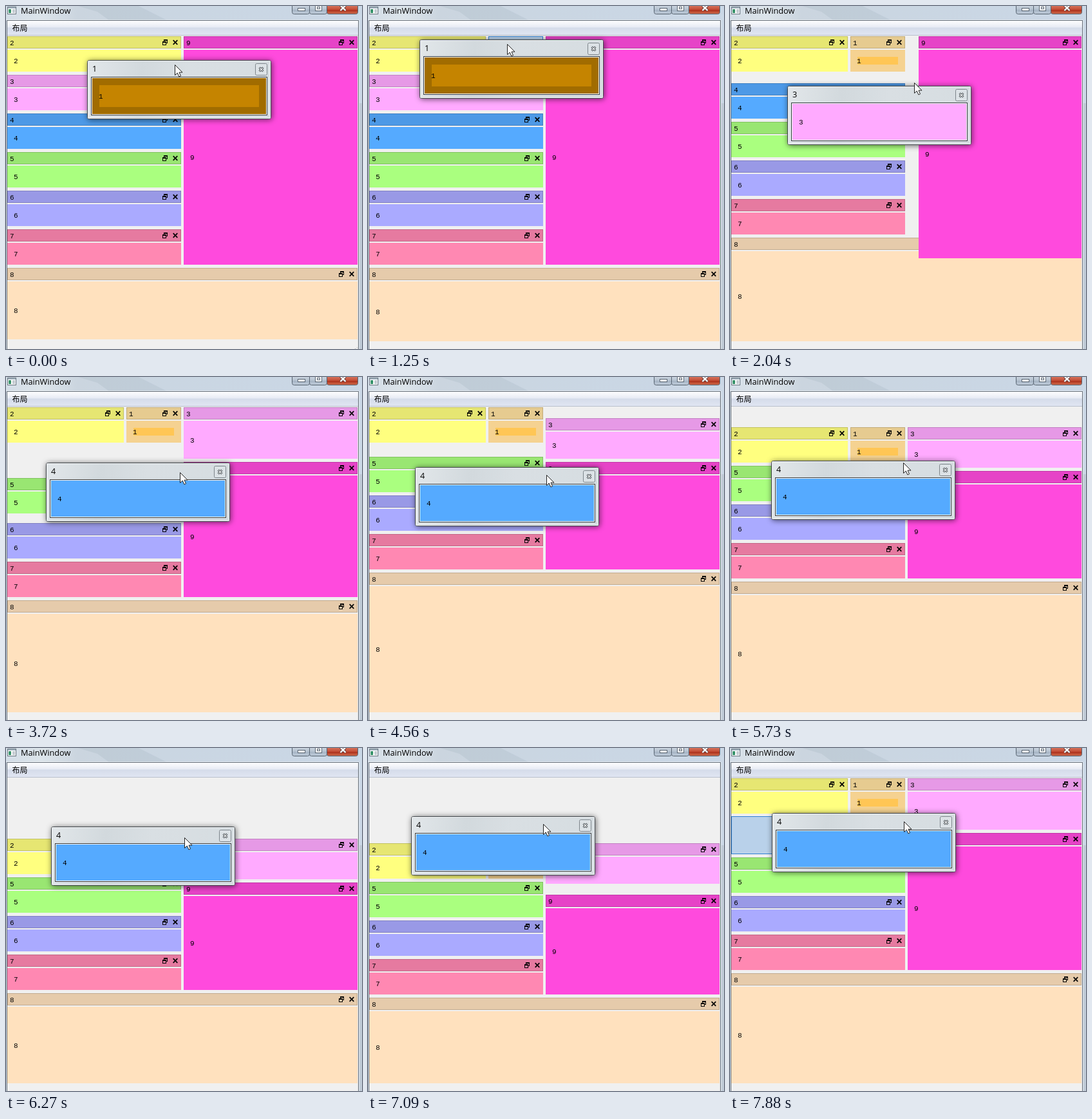
These frames come from a looping animation (553x533 px, 8 s). An HTML page with a canvas:

```html
<!DOCTYPE html>
<html lang="zh">
<head>
<meta charset="utf-8">
<title>MainWindow</title>
<style>
html, body { margin: 0; width: 100%; height: 100%; overflow: hidden; background: #f0f0f0; }
canvas { display: block; }
</style>
</head>
<body>
<canvas id="stage" width="553" height="533"></canvas>
<script>
const ctx = document.getElementById("stage").getContext("2d");
const LOOP = 8000;
const STEP = 135;
const LAG = 60;
const MONO = '11px "Liberation Mono", monospace';
const SANS = '12.7px "Open Sans", sans-serif';

const COLORS = {
  1: [255, 226, 160], 2: [255, 255, 127], 3: [255, 170, 255],
  4: [85, 170, 255], 5: [170, 255, 127], 6: [170, 170, 255],
  7: [255, 136, 178], 8: [255, 225, 190], 9: [255, 74, 221]
};

// Spans in which the screen is redrawn; it holds still in between
const BURSTS = [
  [400, 790], [1250, 1610], [1890, 2320], [2620, 2620], [3030, 3720], [3720, 4020],
  [4170, 5070], [5220, 6130], [6270, 6670], [6950, 7880]
];

// Drags: dock, start, end and where the pointer holds the window
const DRAGS = [
  { id: 1, from: 0, to: 1490, hold: [136, 7] },
  { id: 3, from: 1890, to: 3300, hold: [190, 13] },
  { id: 4, from: 3440, to: LOOP, hold: [205, 13] }
];

// Pointer path
const PATH = [
  [0, 262, 91], [790, 216, 59], [1250, 216, 59], [1610, 200, 112], [1890, 230, 124],
  [1980, 283, 138], [2140, 291, 82], [3030, 289, 86], [3444, 211, 117], [3660, 267, 146],
  [4020, 285, 158], [5010, 271, 147], [5220, 271, 196], [5740, 268, 112], [6210, 275, 135],
  [6670, 290, 165], [7030, 272, 118], [7880, 270, 114]
];

// Smooth 0 to 1 between two times
function ease(t, a, b) {
  const k = Math.min(1, Math.max(0, (t - a) / (b - a)));
  return k * k * (3 - 2 * k);
}

function held(t) {
  const [a, b] = BURSTS.filter(s => s[0] <= t).pop() || [0, 0];
  const n = Math.round((b - a) / STEP);
  if (!n) return a;
  const d = (b - a) / n;
  return a + d * Math.min(n, Math.floor((t - a) / d + .01));
}

function along(t) {
  const i = Math.max(1, PATH.findIndex(p => p[0] > t));
  const [a, b] = t >= PATH.at(-1)[0] ? PATH.slice(-2) : [PATH[i - 1], PATH[i]];
  const k = Math.min(1, Math.max(0, (t - a[0]) / (b[0] - a[0])));
  return [1, 2].map(j => Math.round(a[j] + (b[j] - a[j]) * k));
}

// Space opened and closed above every dock
const shift = (t, delay = 0) => 120 * (
  ease(t, 4420 + delay, 4990 + delay) - ease(t, 5350, 5740) +
  ease(t, 5870, 6440) - ease(t, 6950, 7480));

function layout(t) {
  const first = t < 1890 ? 3 : t < 3440 ? 4 : 5;
  const s = Math.round(shift(t));
  const gap = from => Math.round(
    first === 3 ? 0 :
    first === 4 ? 60 * (1 - ease(t, 1890, 2095)) :
    60 * (1 - ease(t, from, from + 300)) + 63 * ease(t, 7090, 7490));
  const stack = id => 107 + 60 * (id - first) + gap(id === 5 ? 3642 : 3720) + s;
  const squeeze = ease(t, 3720, 4170);
  return {
    first, stack,
    row: 47 + Math.round(shift(t, 205)),
    split: Math.round(272 - 89 * ease(t, 400, 790)),
    rightX: Math.round(276 + (t < 1890 ? 0 : 32 * (1 - ease(t, 1890, 2190)))),
    rightEnd: first === 4 ? Math.round(402 - 60 * ease(t, 1950, 2264)) : stack(8) - 5,
    three: 47 + s,
    threeH: Math.round(59 - 17 * (squeeze - ease(t, 7090, 7490))),
    nine: Math.round(47 + 85 * ease(t, 2040, 2320) - 17 * (squeeze - ease(t, 6950, 7155))) + s
  };
}

const shade = (c, k) => `rgb(${c.map(n => Math.round(n * k)).join()})`;

function rect(x, y, w, h, fill) {
  ctx.fillStyle = fill;
  ctx.fillRect(x, y, w, h);
}

function frame(x, y, w, h, color) {
  ctx.strokeStyle = color;
  ctx.lineWidth = 1;
  ctx.strokeRect(x + .5, y + .5, w - 1, h - 1);
}

function round(x, y, w, h, r, fill, line) {
  ctx.beginPath();
  ctx.roundRect(x + .5, y + .5, w - 1, h - 1, r);
  ctx.fillStyle = fill;
  ctx.fill();
  ctx.strokeStyle = line;
  ctx.lineWidth = 1;
  ctx.stroke();
}

function text(s, x, y, font = MONO) {
  ctx.font = font;
  ctx.fillStyle = "#000";
  ctx.fillText(s, x, y);
}

function fade(x0, y0, x1, y1, ...stops) {
  const g = ctx.createLinearGradient(x0, y0, x1, y1);
  stops.forEach(([p, c]) => g.addColorStop(p, c));
  return g;
}

function poly(fill, ...pts) {
  ctx.beginPath();
  pts.forEach(([x, y]) => ctx.lineTo(x, y));
  ctx.closePath();
  ctx.fillStyle = fill;
  ctx.fill();
}

function cross(x, y, r, color, width) {
  ctx.strokeStyle = color;
  ctx.lineWidth = width;
  ctx.beginPath();
  ctx.moveTo(x - r, y - r); ctx.lineTo(x + r, y + r);
  ctx.moveTo(x + r, y - r); ctx.lineTo(x - r, y + r);
  ctx.stroke();
}

function dock(id, x, y, right, bottom) {
  const c = COLORS[id], w = right - x, top = y + 21;
  rect(x, y, w, 19, shade(c, .9));
  frame(x, y, w, 19, shade(c, .76));
  text(id, x + 4, y + 14);
  rect(right - 27, y + 5, 6, 2, "#000");
  frame(right - 27, y + 5, 6, 6, "#000");
  rect(right - 29, y + 8, 6, 6, shade(c, .9));
  frame(right - 29, y + 8, 6, 6, "#000");
  rect(right - 29, y + 8, 6, 2, "#000");
  cross(right - 9, y + 9.5, 3.3, "#000", 1.7);
  rect(x, top, w, bottom - top, id === 1 ? "#f5d291" : shade(c, 1));
  if (id === 1) rect(x + 11, top + 11, w - 22, bottom - top - 22, "#ffc655");
  text(id, x + 10, Math.round((top + bottom) / 2) + 4);
}

function slot(x, y, w, h) {
  rect(x, y, w, h, "#b9d1ea");
  frame(x, y, w, h, "#2f80d2");
}

function floater(id, x, y) {
  const glass = fade(x, y, x + 286, y + 30, [0, "#e2e7ea"], [.3, "#d2d9dd"], [.55, "#d9dfe3"], [1, "#d6dde1"]);
  ctx.save();
  ctx.shadowColor = "rgba(0,0,0,.55)";
  ctx.shadowBlur = 8;
  ctx.shadowOffsetX = ctx.shadowOffsetY = 1;
  round(x, y, 286, 92, 3, glass, "#41474c");
  ctx.restore();
  round(x, y, 286, 92, 3, glass, "#41474c");
  frame(x + 1, y + 1, 284, 90, "rgba(255,255,255,.6)");
  text(id, x + 8, y + 18, SANS);

  round(x + 261, y + 5, 19, 19, 2, "#dce2e6", "#7d858b");
  cross(x + 270.5, y + 14.5, 2.8, "#4c5358", 3.2);
  cross(x + 270.5, y + 14.5, 2.3, "#fff", 1.2);

  rect(x + 6, y + 26, 274, 60, "#fff");
  frame(x + 6, y + 26, 274, 60, "#343a40");
  rect(x + 8, y + 28, 270, 56, id === 1 ? "#a16c00" : shade(COLORS[id], 1));
  if (id === 1) rect(x + 19, y + 39, 248, 34, "#c58400");
  text(id, x + 18, y + 60);
}

function pointer(x, y) {
  ctx.save();
  ctx.translate(x + .5, y + .5);
  poly("#fff", [0, 0], [0, 16], [3.8, 12.6], [6.4, 18.4], [9, 17.2], [6.5, 11.6], [11.5, 11.6]);
  ctx.strokeStyle = "#222";
  ctx.lineWidth = 1;
  ctx.stroke();
  ctx.restore();
}

function capButton(x, w, top, mid, low, end) {
  round(x, -5, w, 18, 3, fade(0, 0, 0, 13, [0, top], [.45, mid], [.5, low], [1, end]), "#56626f");
}

function chrome(early) {
  rect(0, 0, 553, 533, "#f0f0f0");
  rect(0, 0, 553, 23, fade(0, 0, 553, 0,
    [0, "#d3dde7"], [.1, "#dce4ea"], [.2, "#cbd5df"], [.45, "#cad6e2"], [1, "#cad7e6"]));
  poly("rgba(140,155,170,.16)", [112, 0], [206, 0], [222, 8], [250, 22], [160, 22], [142, 9]);
  rect(0, 21, 548, 1, "rgba(255,255,255,.5)");

  rect(2, 1, 14, 12, "#fff");
  frame(2, 1, 14, 12, "#68757f");
  rect(3, 2, 12, 2, "#a9b8c4");
  rect(4, 5, 4, 6, "#39946b");
  rect(10, 5, 4, 6, "#c4ccd2");
  text("MainWindow", 23, 12, SANS);

  for (const x of [444, 471]) capButton(x, 28, "#c9d3de", "#b3c0ce", "#a7b5c5", "#c3d0de");
  capButton(498, 49, "#d5705a", "#c24b34", "#ae321d", "#d47352");
  rect(453, 3, 12, 5, "#fff");
  frame(453, 3, 12, 5, "#596572");
  rect(480, -3, 11, 11, "#fff");
  frame(480, -3, 11, 11, "#596572");
  frame(483, 1, 5, 4, "#596572");
  cross(523.5, 3, 4, "#5d3c3c", 4);
  cross(523.5, 3, 4, "#fff", 2.4);

  rect(0, 23, 1, 510, "#d5dfe9");
  rect(548, 13, 5, 138, "#ccd9e7");
  rect(548, 151, 5, 382, "#c0cbd7");
  rect(548, 22, 1, 511, "#e3eaf1");
  frame(1, 22, 547, 520, "#656e78");
  rect(2, 23, 545, 22, fade(0, 23, 0, 45,
    [0, "#fdfdfe"], [.45, "#e7ebf4"], [.5, "#d5dcea"], [1, "#e0e5f2"]));
  rect(2, 45, 545, 1, "#b9c0cc");
  text("布局", 9.5, 39, '12px "Noto Sans CJK SC", "Noto Sans CJK", sans-serif');
  if (early) for (const x of [542, 545]) rect(x, 532 - (x - 542) / 2, 1, 1, "#aaa");
}

function draw(t) {
  const early = t < 1250;
  const { first, stack, row, split, rightX, rightEnd, three, threeH, nine } = layout(t);

  chrome(early);
  dock(8, 2, stack(8), 546, early ? 518 : 521);
  dock(2, 2, row, split, row + 55);
  if (t >= 1490) dock(1, 187, row, 272, row + 55);
  for (let id = first; id < 8; id++) dock(id, 2, stack(id), 272, stack(id) + 55);
  if (t >= 3300) dock(3, 276, three, 546, three + 21 + threeH);
  dock(9, rightX, nine, 546, rightEnd);

  // Drop targets under the dragged window
  const within = (a, b) => t >= a && t < b;
  if (within(790, 1490)) slot(187, 47, 85, 55);
  if (within(2320, 3300)) slot(276, 46, 270, 81);
  if (within(5220, 5480) || within(6670, 6950)) slot(2, 46, 544, 116);
  if (within(7600, LOOP)) slot(2, 106, 270, 59);

  const drag = DRAGS.find(d => within(d.from, d.to));
  if (drag) {
    const [x, y] = along(t - LAG);
    floater(drag.id, x - drag.hold[0], y - drag.hold[1]);
  }
  pointer(...along(t));
}

const start = performance.now();
function tick() {
  draw(held((performance.now() - start) % LOOP));
  requestAnimationFrame(tick);
}
tick();
</script>
</body>
</html>
```
